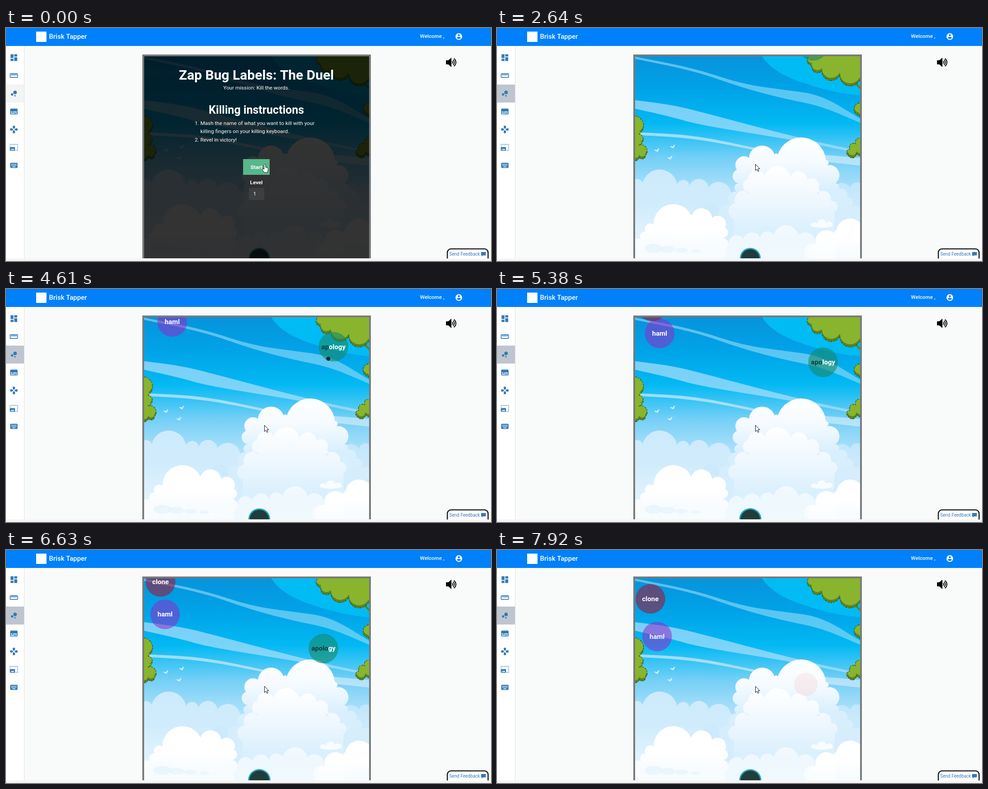
These frames come from a looping animation (1078x519 px, 8 s). An HTML page with a canvas:

```html
<!DOCTYPE html>
<html lang="en">
<head>
<meta charset="utf-8">
<title>Typing game</title>
<style>
html, body { margin: 0; width: 100%; height: 100%; overflow: hidden; background: #f9fbfa; }
canvas { display: block; }
</style>
</head>
<body>
<canvas id="stage" width="1078" height="519"></canvas>
<script>
const W = 1078, H = 519, LOOP = 8000, TAU = Math.PI * 2;
const GAME = { x: 307, y: 63, w: 500, h: 450 };
const CANNON = { x: 563, y: 513 };
const BLUE = '#337ab7';
const PRESS = 1370, PLAY = 1540, FLIGHT = 400, DEATH = 300, RADIUS = 33;

const ctx = document.getElementById('stage').getContext('2d');

function layer(draw) {
  const c = document.createElement('canvas');
  c.width = W;
  c.height = H;
  draw(c.getContext('2d'));
  return c;
}

function box(g, x, y, w, h, fill) {
  g.fillStyle = fill;
  g.fillRect(x, y, w, h);
}

function disc(g, x, y, r, fill, squash = 1) {
  g.fillStyle = fill;
  g.beginPath();
  g.ellipse(x, y, r, r * squash, 0, 0, TAU);
  g.fill();
}

function shape(g, d, fill) {
  g.fillStyle = fill;
  g.fill(new Path2D(d), 'evenodd');
}

function text(g, s, x, y, size, weight, fill, align = 'left') {
  g.font = `${weight} ${size}px Roboto, sans-serif`;
  g.textAlign = align;
  g.fillStyle = fill;
  g.fillText(s, x, y);
}

function fade(g, y0, y1, ...colors) {
  const f = g.createLinearGradient(0, y0, 0, y1);
  colors.forEach((c, i) => f.addColorStop(i / (colors.length - 1), c));
  return f;
}

function clipGame(g) {
  g.beginPath();
  g.rect(GAME.x, GAME.y, GAME.w, GAME.h);
  g.clip();
}

// Outline of round puffs, one arc from each notch to the next.
function puffs(notches) {
  return notches.split(' ').map((p, i, all) => {
    const [x, y] = p.split(',').map(Number);
    if (!i) return `M${x} ${y}`;
    const [px, py] = all[i - 1].split(',').map(Number);
    const r = 0.51 * Math.hypot(x - px, y - py);
    return `A${r} ${r} 0 0 1 ${x} ${y}`;
  }).join('');
}

function cloud(g, notches, fill) {
  const first = notches.split(',')[0];
  shape(g, `${puffs(notches)}V520H${first}Z`, fill);
}

function foliage(g, notches) {
  const path = new Path2D(puffs(notches));
  g.save();
  g.fillStyle = '#5c8220';
  g.fill(path);
  g.save();
  g.clip(path);
  g.translate(0, -6);
  g.fillStyle = '#89b42d';
  g.fill(path);
  g.restore();
  g.strokeStyle = '#35501a';
  g.lineWidth = 1.3;
  g.setLineDash([3, 3, 5, 2]);
  g.stroke(path);
  g.restore();
}

// Smooth band through [x, y, width] points.
function ribbon(g, points, fill) {
  const edge = (pts, side) => pts.map(([x, y, w], i) => {
    const [nx, ny, nw] = pts[i + 1] || pts[i];
    const a = y + side * w / 2, b = ny + side * nw / 2;
    return (i ? `Q${x} ${a} ` : `L${x} ${a}L`) + `${(x + nx) / 2} ${(a + b) / 2}`;
  }).join('');
  const [x, y] = points[0];
  shape(g, `M${x} ${y}${edge(points, -1)}${edge([...points].reverse(), 1)}Z`, fill);
}

const scene = layer(g => {
  clipGame(g);
  box(g, GAME.x, GAME.y, GAME.w, GAME.h,
    fade(g, 62, 513, '#0793dc', '#00a3e8', '#02b9f3', '#72cff6', '#b0e1fa', '#c6e9fc', '#d8f0fd'));

  shape(g, 'M589 62C605 90 640 110 690 125C730 140 780 148 808 150V62Z', '#00bbf4');
  ribbon(g, [[306, 66, 5], [440, 93, 6], [545, 129, 8], [640, 148, 20], [720, 161, 25], [808, 207, 9]], 'rgba(150,220,250,.6)');
  ribbon(g, [[306, 170, 19], [390, 185, 27], [450, 201, 30], [665, 247, 7], [808, 277, 5]], 'rgba(170,222,252,.72)');
  ribbon(g, [[306, 235, 6], [440, 242, 7], [585, 272, 5]], 'rgba(195,232,252,.75)');
  ribbon(g, [[725, 290, 15], [808, 298, 17]], 'rgba(205,235,252,.7)');

  for (const [x, y] of [[355, 272], [390, 264], [384, 289]]) {
    shape(g, `M${x - 6} ${y}Q${x} ${y - 2} ${x + 1} ${y + 1}Q${x + 2} ${y - 4} ${x + 6} ${y - 4}L${x + 2} ${y + 4}Z`, '#d9f2fd');
  }

  cloud(g, '296,352 324,345 400,348 428,352 470,355 520,376 545,400', fade(g, 314, 470, '#cdeafc', '#d0ecfc', '#e2f3fe'));
  cloud(g, '430,425 455,407 495,405 520,425', '#cdeafc');
  cloud(g, '745,370 785,356 815,356', fade(g, 345, 500, '#c3e6fb', '#e0f2fd'));
  cloud(g, '498,425 522,395 532,364 540,346 533,316 560,289 617,282 624,282 731,294 733,306 752,346 755,362 778,378 786,400 812,425',
    fade(g, 245, 420, '#ffffff', '#f4faff', '#d9effd', '#d5edfc'));
  cloud(g, '526,425 530,391 562,368 558,336 595,330 652,332 690,338 714,358 710,370 742,385 750,410',
    fade(g, 308, 450, '#ffffff', '#f0f8fe', '#dbf0fd'));
  cloud(g, '490,500 515,480 548,471 585,470 615,462 670,462 705,482 730,500', fade(g, 437, 513, '#f4fafe', '#e6f5fd'));
  cloud(g, '296,492 324,474 330,453 348,438 432,418 478,423 507,445 500,468 508,492', fade(g, 387, 513, '#ffffff', '#ffffff', '#f1f9fe'));
  cloud(g, '688,513 708,482 752,460 754,451 815,448', fade(g, 425, 513, '#ffffff', '#ffffff', '#f0f9fe'));
  cloud(g, '704,520 708,482 715,478 752,460', 'rgba(255,255,255,.4)');

  shape(g, `${puffs('698,441 711,436 732,434 746,441')}Q722 449 698 441Z`, '#f8fcff');
  for (let i = 0; i < 4; i++) disc(g, 348 + i * 31, 491 + i * 2, 20 - i * 3, 'rgba(219,239,251,.6)', 0.5 - i * 0.05);
  box(g, 306, 465, 502, 48, fade(g, 465, 513, 'rgba(255,255,255,0)', 'rgba(255,255,255,.4)'));

  g.strokeStyle = '#5c8220';
  g.lineWidth = 4;
  g.stroke(new Path2D('M792 118L810 137'));
  foliage(g, '815,116 806,116 762,105 722,95 700,84 698,60 815,60');
  foliage(g, '300,196 316,236 314,261 330,284 316,288 300,290');
  foliage(g, '812,195 805,195 805,167 812,167');
  foliage(g, '815,276 799,280 781,284 785,270 797,258 812,248');
});

// Icon parts on a 24 unit grid.
const cell = (x, y, w = 2, h = 2) => `M${x} ${y}h${w}v${h}h${-w}z`;
const round = (x, y, w, h) => `M${x + 2} ${y}h${w - 4}a2 2 0 0 1 2 2v${h - 4}a2 2 0 0 1-2 2h${4 - w}a2 2 0 0 1-2-2v${4 - h}a2 2 0 0 1 2-2z`;
const ring = (x, y, r) => `M${x - r} ${y}a${r} ${r} 0 1 0 ${2 * r} 0a${r} ${r} 0 1 0 ${-2 * r} 0z`;
const row = (n, part) => Array.from({ length: n }, (_, i) => part(i)).join('');

const MENU = [
  cell(3, 3, 8, 10) + cell(3, 15, 8, 6) + cell(13, 11, 8, 10) + cell(13, 3, 8, 6),
  round(1, 6, 22, 12) + cell(3, 8, 18, 8) + row(4, i => cell(5 + 4 * i, 8, 2, 4)),
  ring(7.2, 14.4, 3.2) + ring(14.8, 18, 2) + ring(15.2, 8.8, 4.8),
  round(2, 4, 20, 16) + cell(4, 12, 4) + cell(10, 12, 10) + cell(4, 16, 10) + cell(16, 16, 4),
  'M15 7.5V2H9v5.5l3 3 3-3zM7.5 9H2v6h5.5l3-3-3-3zM9 16.5V22h6v-5.5l-3-3-3 3zM16.5 9l-3 3 3 3H22V9h-5.5z',
  row(6, i => cell(1 + 4 * i, 3)) + row(4, i => cell(21, 7 + 4 * i)) + cell(1, 7) + cell(17, 19) +
    'M1 11v8c0 1.1.9 2 2 2h12V11zM3 19l2.500-3.200 1.800 2.100 2.500-3.200L13 19z',
  round(2, 5, 20, 14) + row(5, i => cell(5 + 3 * i, 8) + cell(5 + 3 * i, 11)) + cell(8, 15, 8)
];
const USER = ring(12, 12, 10) + ring(12, 8, 3) + 'M12 19.200c-2.500 0-4.700-1.300-6-3.200 0-2 4-3.100 6-3.100s6 1.100 6 3.100c-1.300 1.900-3.500 3.200-6 3.200z';

function icon(g, d, cx, cy, scale, fill) {
  g.save();
  g.translate(cx, cy);
  g.scale(scale, scale);
  g.translate(-12, -12);
  shape(g, d, fill);
  g.restore();
}

const page = layer(g => {
  box(g, 0, 0, W, H, '#f9fbfa');
  box(g, 0, 40, 40, 473, '#fff');
  box(g, 40, 40, 1, 473, '#dfe2e3');
  box(g, 0, 513, W, 6, '#f5f5f5');
  box(g, 0, 0, W, 40, '#0080fb');

  box(g, 67, 8, 23, 23, '#fff');
  text(g, 'Brisk Tapper', 95.5, 23.5, 15.06, 500, '#fff');
  text(g, 'Welcome ,', 920, 22, 11.72, 500, '#fff');
  icon(g, USER, 1006.5, 19, 0.74, '#fff');
  box(g, 303, 59, 508, 454, '#777b7c');

  shape(g, 'M978 72H983L990 66V87L983 81H978Z', '#000');
  g.strokeStyle = '#000';
  g.lineWidth = 1.9;
  for (const r of [3.5, 7, 10.5]) {
    g.beginPath();
    g.arc(989.5, 76.5, r, -0.95, 0.95);
    g.stroke();
  }

  g.save();
  g.beginPath();
  g.rect(975, 485, 103, 28.5);
  g.clip();
  g.beginPath();
  g.roundRect(981, 492, 90.5, 40, 8);
  g.fillStyle = '#fff';
  g.fill();
  g.strokeStyle = '#1f2224';
  g.lineWidth = 2.6;
  g.stroke();
  g.restore();
  text(g, 'Send Feedback', 985.3, 507, 10.04, 400, BLUE);
  shape(g, 'M1056 499h10.500v7.500h-6.500l-2.500 2.500v-2.500h-1.500z', BLUE);
});

// Each falls with a slight pull while swaying; y is its height at time t0.
const BALLOONS = [
  { word: 'haml', rgb: '150,38,200', alpha: 0.53, t0: 3510, y: 39, speed: 30, pull: 1.1,
    mid: 369.5, sway: -16.5, rate: 0.654, lag: 1.1 },
  { word: 'clone', rgb: '150,30,65', alpha: 0.61, t0: 6080, y: 57, speed: 24.5, pull: 2,
    mid: 342.3, sway: -2.4, rate: 0.86, lag: 1.16 },
  { word: 'apology', rgb: '24,136,100', alpha: 0.58, t0: 3510, y: 79, speed: 45, pull: 0,
    mid: 706, sway: 22, rate: 0.83, lag: -0.69,
    keys: [3650, 4238, 4820, 5405, 5992, 7180, 7300], dies: 7700 }
];

function balloon(b, t) {
  const s = (t - b.t0) / 1000;
  const x = b.mid + b.sway * Math.sin(b.rate * (s - b.lag));
  const y = b.y + b.speed * s + b.pull * s * Math.abs(s);
  if (y < GAME.y - RADIUS) return;

  const gone = (t - b.dies) / DEATH;
  if (gone > 0) {
    disc(ctx, x, y + 30 * gone, RADIUS - 9.5 * gone, `rgba(235,90,80,${0.34 * (1 - gone)})`);
    return;
  }
  disc(ctx, x, y, RADIUS, `rgba(${b.rgb},${b.alpha})`);

  const shots = (b.keys || []).filter(k => k <= t);
  const typed = b.word.slice(0, shots.length), rest = b.word.slice(shots.length);
  ctx.font = '700 15.06px Roboto, sans-serif';
  const left = x - ctx.measureText(b.word).width / 2;
  const split = left + ctx.measureText(typed).width;
  text(ctx, typed, left, y + 5, 15.06, 700, '#153a3c');
  text(ctx, rest, split, y + 5, 15.06, 700, '#fff');

  for (const k of shots) {
    const p = (t - k) / FLIGHT;
    if (p < 1) disc(ctx, CANNON.x + (x - CANNON.x) * p, CANNON.y + (y - CANNON.y) * p, 4.5, '#0b2433');
  }
}

function cannon(t) {
  const r = 23 - Math.cos((t - PLAY) / 1610);
  disc(ctx, CANNON.x, CANNON.y, r + 1, '#1fa6bd');
  disc(ctx, CANNON.x, CANNON.y, r - 2, '#213c3b');
}

function counter(t) {
  const k = (t - 3280) / 460;
  if (k < 0 || k > 1) return;
  ctx.globalAlpha = 1 - k * 0.6;
  text(ctx, '1', 556.5, 485 - 16 * k, 15.06, 400, '#35a9a4', 'center');
  ctx.globalAlpha = 1;
}

function dialog(t) {
  box(ctx, GAME.x, GAME.y, GAME.w, GAME.h, 'rgba(0,0,0,.8)');
  box(ctx, 527, 292, 59, 35, t < PRESS ? '#57b88b' : '#4fae82');
  box(ctx, 540, 356, 34, 27, '#3e3f42');
  const center = (s, y, size, weight) => text(ctx, s, 556.5, y, size, weight, '#fff', 'center');
  const line = (s, x, y) => text(ctx, s, x, y, 11.72, 400, '#fff');
  center('Zap Bug Labels: The Duel', 114.5, 30.1, 700);
  center('Your mission: Kill the words.', 136.5, 11.72, 400);
  center('Killing instructions', 190.5, 25.1, 700);
  line('1.', 419.5, 216);
  line('Mash the name of what you want to kill with your', 432, 216);
  line('killing fingers on your killing keyboard.', 432, 234);
  line('2.', 419.5, 252.5);
  line('Revel in victory!', 432, 252.5);
  center('Start', 313.5, 11.72, 700);
  center('Level', 348, 11.72, 700);
  line('1', 549.5, 373);
}

const HAND = new Path2D('M573.500 304.500Q575.500 302 577 304.500V310L581.500 311.500Q583.500 312.500 582.500 316L581 322H574.500L569.500 315.500Q569 313 571 313L573.500 315Z');
const ARROW = new Path2D('M574.500 303.500V317.500L577.500 314.500L580 319.500L582 318.500L580 313.500H584Z');

function pointer(path) {
  ctx.fillStyle = '#fff';
  ctx.fill(path);
  ctx.strokeStyle = '#111';
  ctx.lineWidth = 1;
  ctx.stroke(path);
}

function draw(t) {
  ctx.drawImage(page, 0, 0);
  box(ctx, 0, 126, 40, 40, t < PRESS ? '#f3f4f4' : '#bfc5cf');
  MENU.forEach((d, i) => icon(ctx, d, 17.5, 66 + 40 * i, 0.82, BLUE));

  ctx.save();
  clipGame(ctx);
  ctx.drawImage(scene, 0, 0);
  if (t >= PLAY) {
    counter(t);
    BALLOONS.forEach(b => balloon(b, t));
  }
  cannon(t);
  if (t < PLAY) dialog(t);
  ctx.restore();
  pointer(t < PLAY ? HAND : ARROW);
}

let start = null;
function tick(now) {
  if (start === null) start = now;
  draw((now - start) % LOOP);
  requestAnimationFrame(tick);
}
draw(0);
requestAnimationFrame(tick);
</script>
</body>
</html>
```
